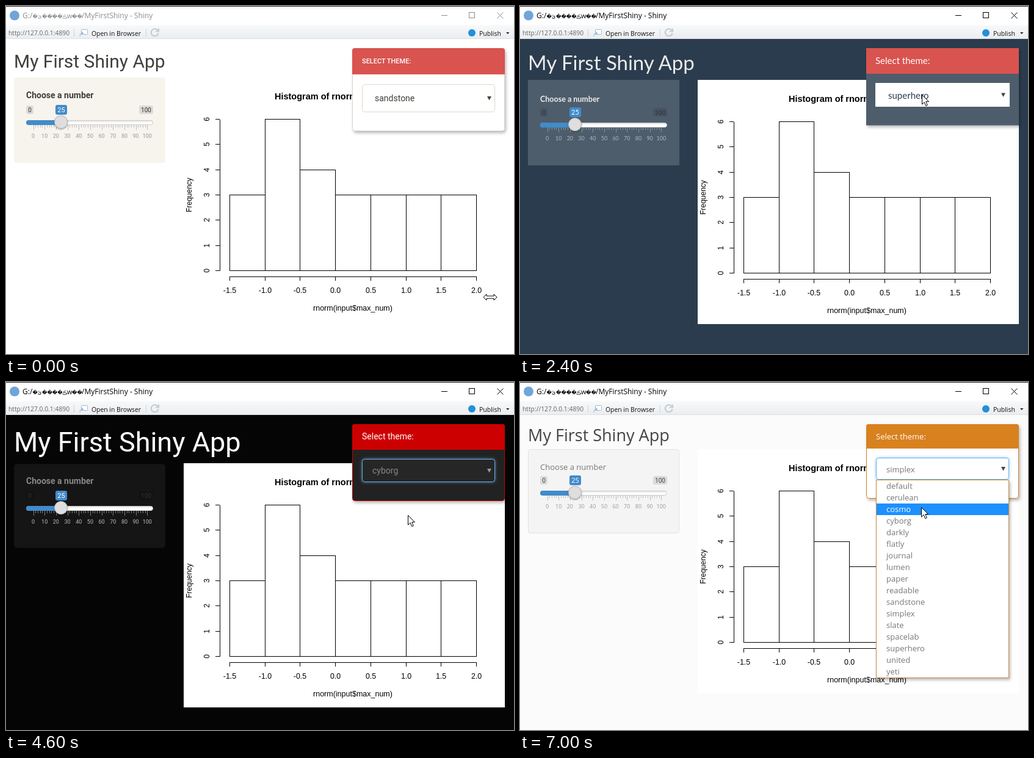
These frames come from a looping animation (832 by 570 pixels, 7.1 s). An HTML page:

```html
<!DOCTYPE html>
<html lang="en">
<head>
<meta charset="utf-8">
<title>Shiny theme selector</title>
<style>
html, body { margin: 0; width: 100%; height: 100%; overflow: hidden; background: #fff; }
svg { display: block; }
.crisp { shape-rendering: crispEdges; }
</style>
</head>
<body>
<svg id="stage" width="832" height="570" viewBox="0 0 832 570">
  <defs>
    <linearGradient id="bar" x2="0" y2="1"><stop stop-color="#f8f9fa"/><stop offset="1" stop-color="#eaedf0"/></linearGradient>
    <linearGradient id="track" x2="0" y2="1"><stop stop-color="#dcdcdc"/><stop offset=".5" stop-color="#fff"/></linearGradient>
    <filter id="shadow" x="-10%" y="-10%" width="125%" height="130%"><feDropShadow dx="2" dy="3" stdDeviation="2.5" flood-opacity=".28"/></filter>
    <filter id="soft" x="-30%" y="-30%" width="160%" height="160%"><feDropShadow dx="0" dy="1" stdDeviation="1" flood-opacity=".4"/></filter>
    <filter id="glow" x="-10%" y="-30%" width="120%" height="160%"><feDropShadow dx="0" dy="0" stdDeviation="2.5" flood-color="#66afe9" flood-opacity=".7"/></filter>
  </defs>
  <g id="page"></g>
  <g id="chrome"></g>
  <g id="pointer"></g>
</svg>
<script>
const LOOP = 7100, STEP = 100;
const names = ['default', 'cerulean', 'cosmo', 'cyborg', 'darkly', 'flatly', 'journal', 'lumen', 'paper',
  'readable', 'sandstone', 'simplex', 'slate', 'spacelab', 'superhero', 'united', 'yeti'];

// well, slider and plot are vertical positions; head, panelEnd and box describe the theme panel
const themes = {
  sandstone: {
    font: 'Roboto', page: '#fff', title: [30, 101, '#3e3f3a'], well: [117, 257, '#f7f4ee', '#f7f4ee'],
    label: [151, 14, 700, '#3e3f3a'], slider: 0, plot: 117, grid: '#999', radius: 4,
    head: [112, '#d9534f', 'SELECT THEME:', 11, 500, 94], panelEnd: 204.5, panel: '#fff', edge: '#ddd3cc',
    box: [583, 128, 218, 46], input: ['#fff', '#dfd7ca', '#3e3f3a', 604, 156, 14], pitch: 18
  },
  superhero: {
    font: 'Lato', page: '#2b3c4e', title: [33, 105, '#ebebeb'], well: [121, 261, '#4e5d6c', '#4e5d6c'],
    label: [157, 12.5, 700, '#ebebeb'], slider: 4, plot: 121, grid: '#aeb6bd', radius: 0,
    head: [111, '#d9534f', 'Select theme:', 15, 400, 95], panelEnd: 195, panel: '#4e5d6c', edge: '#4e5d6c',
    box: [582, 126, 220, 39], input: ['#fff', '#fff', '#2b3e50', 603, 152, 15], pitch: 19
  },
  united: {
    font: 'Open Sans', page: '#fff', title: [30, 101, '#333'], well: [117, 257, '#f5f5f5', '#e3e3e3'],
    label: [151, 14, 700, '#333'], slider: 0, plot: 117, grid: '#999', radius: 4,
    head: [111, '#df382c', 'Select theme:', 14, 400, 94], panelEnd: 194.5, panel: '#fff', edge: '#df382c',
    box: [583, 126, 218, 38], input: ['#fff', '#66afe9', '#777', 600, 150, 14], pitch: 18, focus: true
  },
  cyborg: {
    font: 'Roboto', page: '#050505', title: [45, 114, '#fff'], well: [134, 272, '#151515', '#101010'],
    label: [167, 14, 700, '#888'], slider: 16, plot: 133, grid: '#bbb', radius: 4,
    head: [111, '#c00', 'Select theme:', 14, 400, 94], panelEnd: 194.5, panel: '#222', edge: '#c00',
    box: [583, 126, 218, 38], input: ['#252525', '#66afe9', '#888', 600, 150, 14], pitch: 18, focus: true
  },
  simplex: {
    font: 'Open Sans', page: '#fbfbfb', title: [27, 97, '#444'], well: [110, 248, '#f4f4f4', '#e1e1e1'],
    label: [144, 13, 400, '#777'], slider: -9, plot: 110, grid: '#999', radius: 4,
    head: [109, '#d8811f', 'Select theme:', 13, 400, 94], panelEnd: 190.5, panel: '#fff', edge: '#d8811f',
    box: [583, 124, 218, 36], input: ['#fff', '#66afe9', '#777', 600, 148, 13], pitch: 19, focus: true
  }
};

const themeAt = [[0, 'sandstone'], [1900, 'superhero'], [3400, 'united'], [4600, 'cyborg'], [5800, 'simplex']];
const valueAt = [[0, 'sandstone'], [1600, 'superhero'], [3000, 'united'], [4400, 'cyborg'], [5600, 'simplex']];
const openSpans = [[800, 1600], [2500, 3000], [4000, 4400], [5200, 5600], [6600, 7100]];
const ACTIVE_FROM = 700;
const path = [[0, 793, 477], [100, 790, 470], [600, 688, 150], [800, 688, 152], [1500, 668, 433], [1800, 668, 433],
  [2300, 658, 145], [2500, 658, 145], [2900, 680, 458], [3200, 680, 450], [3300, 683, 401], [3800, 660, 146],
  [4000, 660, 146], [4400, 658, 218], [4700, 658, 218], [5000, 662, 148], [5200, 662, 148], [5600, 667, 364],
  [5900, 667, 364], [6400, 660, 145], [6600, 660, 145], [6900, 657, 205], [7100, 657, 205]];

const $ = id => document.getElementById(id);
const latest = (list, t) => list.filter(entry => entry[0] <= t).pop()[1];
const rect = (x, y, w, h, fill, more = '') => `<rect x="${x}" y="${y}" width="${w}" height="${h}" fill="${fill}" ${more}/>`;
const text = (x, y, s, size, fill, more = '') => `<text x="${x}" y="${y}" font-size="${size}" fill="${fill}" ${more}>${s}</text>`;
const line = (d, color = '#000', more = 'class="crisp"') => `<path d="${d}" fill="none" stroke="${color}" ${more}/>`;
const family = name => `font-family="${name}, sans-serif"`;
const mid = 'text-anchor="middle"';

function pointerAt(t) {
  const i = path.findIndex((p, k) => k + 1 === path.length || t < path[k + 1][0]);
  const [t0, x0, y0] = path[i], [t1, x1, y1] = path[i + 1] || [t0 + 1, x0, y0];
  const u = (t - t0) / (t1 - t0), e = u * u * (3 - 2 * u);
  return [Math.round(x0 + (x1 - x0) * e), Math.round(y0 + (y1 - y0) * e)];
}

function drawSlider(th) {
  const gridX = i => 44.5 + i * 18.68;
  let ticks = '', labels = '';
  for (let i = 0; i <= 50; i++) ticks += `M${Math.round(gridX(i / 5)) + .5} 195v${i % 5 ? 4 : 8}`;
  for (let i = 0; i <= 10; i++) labels += text(gridX(i), 216, i * 10, 9, th.grid, mid);
  const badge = (x, w, s) => rect(x, 163, w, 14, 'rgba(0,0,0,.1)', 'rx="3"') + text(x + w / 2, 173.5, s, 10, '#333', mid);
  return `<g transform="translate(0 ${th.slider})">` + line(ticks, th.grid, 'class="crisp" opacity=".6"') + labels +
    badge(33, 12, 0) + badge(218, 23, 100) +
    rect(33.5, 187.5, 207, 7, 'url(#track)', 'rx="3.5" stroke="#ccc"') +
    rect(33, 187, 57, 8, '#428bca', 'rx="4"') +
    rect(81, 162, 19, 16, '#428bca', 'rx="3"') + text(90.5, 173.7, 25, 11, '#fff', mid) +
    '<circle cx="90" cy="190" r="10.5" fill="#dedede" stroke="#b4b4b4" filter="url(#soft)"/></g>';
}

function drawPlot(th) {
  const px = i => Math.round(366 + i * 57.7) + .5, py = n => Math.round(433 - n * 41.33) + .5;
  const counts = [3, 6, 4, 3, 3, 3, 3];
  let out = rect(291, 117, 526, 400, '#fff');
  let d = `M350.5 ${py(0)}V${py(6)}M${px(0)} 443.5H${px(7)}`;
  counts.forEach((n, i) => d += `M${px(i)} ${py(0)}V${py(n)}H${px(i + 1)}V${py(0)}Z`);
  for (let n = 0; n <= 6; n++) {
    d += `M343 ${py(n)}h7`;
    out += text(0, 0, n, 12, '#000', `${mid} transform="translate(333 ${py(n)}) rotate(-90)"`);
  }
  for (let i = 0; i <= 7; i++) {
    d += `M${px(i)} 443v7`;
    out += text(px(i), 470, (i / 2 - 1.5).toFixed(1), 12.4, '#000', mid);
  }
  out += line(d) + text(568, 153, 'Histogram of rnorm(input$max_num)', 14.5, '#000', mid + ' font-weight="700"') +
    text(568, 499, 'rnorm(input$max_num)', 12.5, '#000', mid) +
    text(0, 0, 'Frequency', 12, '#000', mid + ' transform="translate(304 309.5) rotate(-90)"');
  return `<g transform="translate(0 ${th.plot - 117})" ${family('Liberation Sans')}>${out}</g>`;
}

function drawPanel(th, value) {
  const [headEnd, headFill, caption, size, weight, base] = th.head;
  const [x, y, w, h] = th.box, [bg, edge, ink, tx, ty, ts] = th.input;
  const r = th.radius, cy = y + h / 2;
  return rect(567.5, 69.5, 249, th.panelEnd - 69.5, th.panel, `rx="${r}" stroke="${th.edge}" filter="url(#shadow)"`) +
    `<path d="M567 ${headEnd}V${69 + r}q0 ${-r} ${r} ${-r}H${817 - r}q${r} 0 ${r} ${r}V${headEnd}Z" fill="${headFill}"/>` +
    text(x, base, caption, size, '#fff', `font-weight="${weight}"`) +
    rect(x + .5, y + .5, w - 1, h - 1, bg, `rx="${r}" stroke="${edge}" ${th.focus ? 'filter="url(#glow)"' : ''}`) +
    text(tx, ty, value, ts, ink) +
    `<path d="M788 ${cy - 3}h7l-3.5 6.5z" fill="${th.page === '#050505' ? '#999' : '#444'}"/>`;
}

function drawMenu(th, value, pointerY) {
  const [x, y, w, h] = th.box, [bg, , ink, tx, , ts] = th.input;
  const top = y + h + 1, over = Math.floor((pointerY - top) / th.pitch);
  const picked = over >= 0 ? Math.min(over, 16) : names.indexOf(value);
  let out = rect(x + .5, top - .5, w - 1, names.length * th.pitch + 1, bg,
    `stroke="${th.edge === '#d8811f' ? '#c98a3c' : '#888'}" class="crisp" filter="url(#shadow)"`);
  names.forEach((name, i) => {
    const rowY = top + i * th.pitch, on = i === picked;
    if (on) out += rect(x + 1, rowY, w - 2, th.pitch, '#1e90ff');
    out += text(tx, rowY + th.pitch / 2 + ts * .35, name, ts, on ? '#fff' : ink);
  });
  return out;
}

function drawPage(th, value, open, pointerY) {
  const [size, base, ink] = th.title, [top, end, fill, edge] = th.well, [ly, ls, lw, lc] = th.label;
  return `<g ${family(th.font)}>` + rect(0, 54, 832, 516, th.page) + text(13, base, 'My First Shiny App', size, ink) +
    rect(13.5, top + .5, 247, end - top - 1, fill, `rx="${th.radius}" stroke="${edge}"`) +
    text(33, ly, 'Choose a number', ls, lc, `font-weight="${lw}"`) +
    drawSlider(th) + drawPlot(th) + drawPanel(th, value) + (open ? drawMenu(th, value, pointerY) : '') + '</g>';
}

function drawChrome(active) {
  const ink = active ? '#000' : '#8c8c8c';
  const glyphs = (x, s) => text(x, 19.5, s, 8.2, ink, family('DejaVu Sans'));
  return `<g ${family('Open Sans')}>` + rect(0, 0, 832, 31, '#fff') + rect(0, 0, 832, 1, '#2b2424') +
    rect(0, 31, 832, 23, 'url(#bar)') + rect(0, 53, 832, 1, '#dde0e3') +
    '<circle cx="14" cy="15.5" r="8" fill="#6fa5d8"/>' +
    text(27, 20, 'G:/', 12, ink) + glyphs(43.5, '\uFFFD') + glyphs(52, '\u0626') + glyphs(59, '\uFFFD'.repeat(4)) +
    glyphs(92, '\u06AA') + text(100, 20, 'w', 11, ink) + glyphs(108, '\uFFFD\uFFFD') +
    text(124, 20, '/MyFirstShiny - Shiny', 12, ink) +
    line('M713 15.5h10M758.5 10.5h9v9h-9z', ink) + line('M804.5 10.5l10 10m0-10l-10 10', ink, '') +
    text(4, 48, 'http://127.0.0.1:4890', 10.3, '#666') + line('M111.5 37v13M229.5 37v13', '#cfd3d6') +
    rect(123.5, 38.5, 10, 8, '#fff', 'rx="1" stroke="#a9b8c4"') +
    line('M121 49.5q0-5 5-5m-2-2l2.500 2-2.500 2', '#6fa5d8', '') +
    text(140, 48.5, 'Open in Browser', 10.4, '#111') +
    line('M248.500 39.500a6 6 0 1 0 1.200 5M250 37v4.500h-5', '#c3c9ce', 'stroke-width="2"') +
    '<circle cx="763" cy="44" r="6" fill="#2191d9"/>' + text(775, 48.5, 'Publish', 10.5, '#111') +
    '<path d="M819 43h5.500l-2.750 3z" fill="#222"/></g>';
}

function drawPointer(x, y, resize) {
  const d = resize
    ? 'M-11 0l5-5v3h12v-3l5 5-5 5v-3h-12v3z'
    : 'M.5.5V16l3.700-3.400 2.500 6 2.600-1.100-2.500-5.900h4.700z';
  return `<path transform="translate(${x} ${y})" d="${d}" fill="#fff" stroke="#000"/>`;
}

let shown = -1;
function update(now) {
  const t = Math.floor(now % LOOP / STEP) * STEP;
  if (t !== shown) {
    shown = t;
    const [x, y] = pointerAt(t);
    const open = openSpans.some(([from, to]) => t >= from && t < to);
    $('page').innerHTML = drawPage(themes[latest(themeAt, t)], latest(valueAt, t), open, y);
    $('chrome').innerHTML = drawChrome(t >= ACTIVE_FROM);
    $('pointer').innerHTML = drawPointer(x, y, t < 200);
  }
}

const start = performance.now();
function frame() {
  update(performance.now() - start);
  requestAnimationFrame(frame);
}
frame();
</script>
</body>
</html>
```
